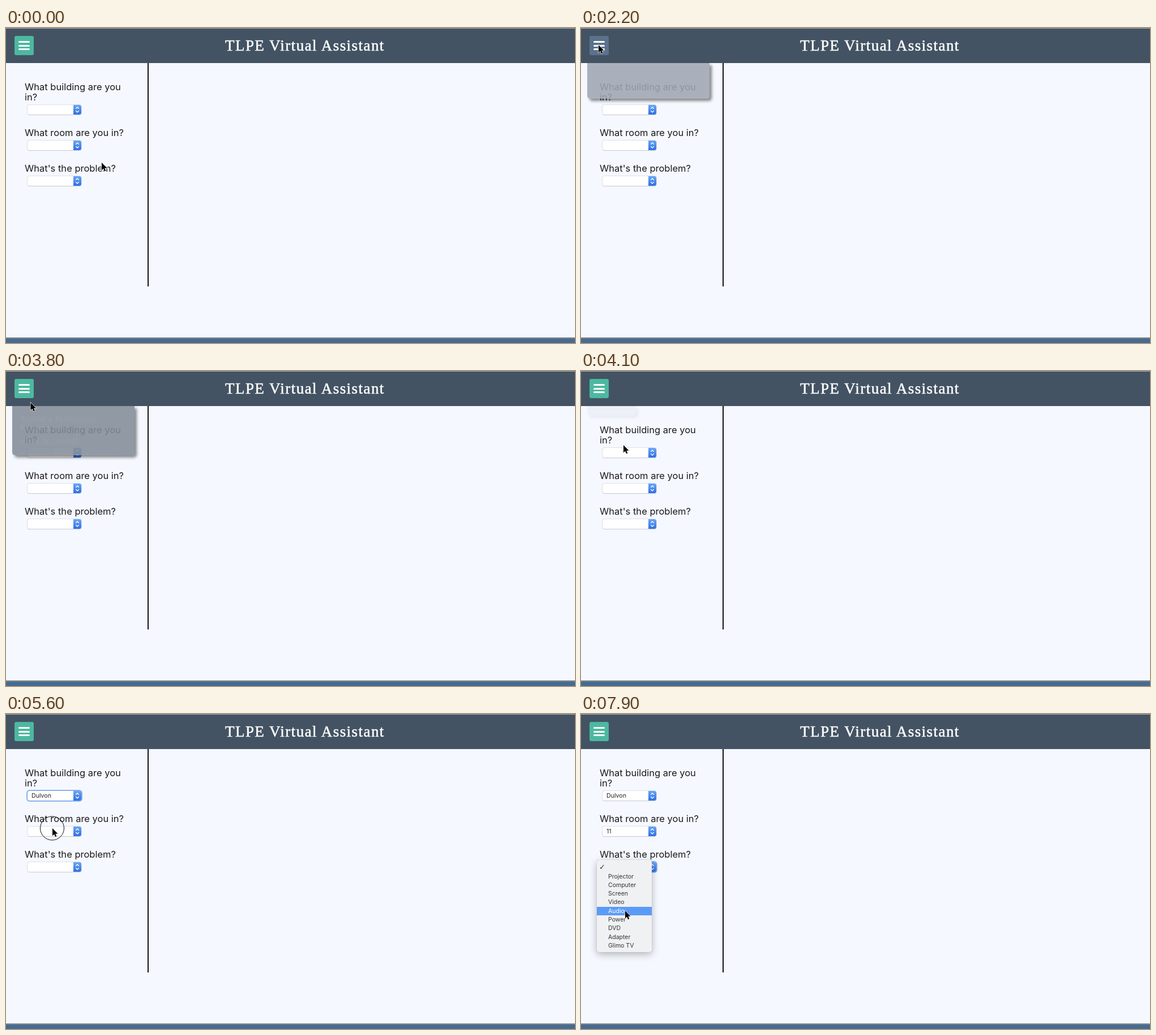
An HTML page that plays this animation: 1005x557 px, repeating every 8 s.

```html
<!DOCTYPE html>
<html lang="en">
<head>
<meta charset="utf-8">
<title>Virtual Assistant</title>
<style>
html, body { margin: 0; width: 100%; height: 100%; overflow: hidden; }
body { background: #f5f8fe; font-family: Inter, sans-serif; }
#stage { position: relative; width: 1005px; height: 557px; overflow: hidden; white-space: nowrap; }
#stage div, #stage svg { position: absolute; box-sizing: border-box; }
#header { left: 0; top: 0; width: 1005px; height: 62px; background: #435363; border-top: 1px solid #a9b1b9; }
#title { left: 387px; top: 0; color: #fff; font: 27px/62px "Liberation Serif", serif; letter-spacing: 1.45px; -webkit-text-stroke: .55px #fff; }
#button { left: 15px; top: 14px; width: 34px; height: 34px; border-radius: 3px; }
#button div { left: 7px; width: 20px; height: 3px; border-radius: 1.5px; background: #fff; }
#rule { left: 250px; top: 62px; width: 2px; height: 395px; background: #111; }
#footer { left: 0; top: 547px; width: 1005px; height: 10px; background: #466b92; border-top: 2px solid #8b8d90; }
.question { left: 33px; font-size: 16.5px; line-height: 18px; color: #1a1a1a; }
.select { left: 38px; width: 95px; height: 17px; padding-left: 7px; border-radius: 3.5px; background: #fff; font-size: 10.6px; line-height: 17px; color: #222; }
.select svg { right: 0; top: 0; }
#menu { left: 11px; top: 62px; border-radius: 0 0 5px 5px; overflow: hidden; }
#menu div { left: 14px; color: #fff; font-size: 13.5px; font-weight: 500; line-height: 15px; }
.popup { left: 28px; width: 97px; padding: 4px 0; border-radius: 4px; background: #f0f1f3; box-shadow: 0 0 1px #888, 0 4px 14px rgba(0,0,0,.28); font-size: 10.5px; color: #333; }
#stage .popup div { position: relative; height: 15.33px; line-height: 15.33px; padding-left: 20px; }
#stage .popup .blank { height: 17.5px; line-height: 17px; padding-left: 4px; font: bold 13px/17px "DejaVu Sans", sans-serif; }
#ring { left: 0; top: 0; width: 43px; height: 43px; border: 1.7px solid #111; border-radius: 50%; }
#pointer { left: 0; top: 0; }
</style>
</head>
<body>
<div id="stage">
  <div id="rule"></div>
  <div id="footer"></div>
  <div class="question" style="top:95px">What building are you<br>in?</div>
  <div class="question" style="top:176px">What room are you in?</div>
  <div class="question" style="top:239px">What's the problem?</div>
  <div id="fields"></div>
  <div id="menu">
    <div style="top:16px">Submit a Technology<br>Request</div>
    <div style="top:55px">What do I need?</div>
    <div style="top:80px">Campus Technology Home</div>
    <div style="top:104px">TLPE Home</div>
    <div style="top:129px">Request Manager</div>
  </div>
  <div id="header"></div>
  <div id="title">TLPE Virtual Assistant</div>
  <div id="button"><div style="top:9px"></div><div style="top:15.5px"></div><div style="top:22px"></div></div>
  <div id="popups"></div>
  <div id="ring"></div>
  <svg id="pointer" width="16" height="22" viewBox="-2 -2 16 22">
    <path d="M0 0V13.4L3 10.5 5.1 15.3 7.4 14.3 5.3 9.8H9.5Z" fill="#000" stroke="#fff" stroke-width="1.2" paint-order="stroke"/>
  </svg>
</div>
<script>
const LOOP = 8000, STEP = 100;
const $ = id => document.getElementById(id);
const clamp = v => Math.max(0, Math.min(1, v));
const mix = (a, b, k) => a + (b - a) * k;
const range = (a, b) => Array.from({ length: b - a + 1 }, (_, i) => a + i);

// y: centre of the field; open/close: popup times; focus: start and end of the focus glow
const fields = [
  { y: 144.5, open: 4500, close: 5200, focus: [4500, 5700], value: "Dulvon",
    items: ["Library", "Chapel", "Dulvon", "Gymnasium", "Main Hall"] },
  { y: 207.5, open: 5700, close: 6300, focus: [5700, 7200], value: "11",
    items: [11, 12, 13, 15, 16, 17, 20, ...range(101, 105), 195, ...range(201, 212)] },
  { y: 270.5, open: 7200, close: LOOP, focus: [7200, LOOP], value: "",
    items: ["Projector", "Computer", "Screen", "Video", "Audio", "Power", "DVD", "Adapter", "Glimo TV"] }
];

// time, x, y of the pointer tip
const path = [
  [0, 169, 238], [100, 169, 238], [1100, 33, 34], [1500, 31, 30], [2800, 31, 30], [2900, 33, 31],
  [3700, 33, 31], [4100, 75, 131], [4350, 79, 139], [4600, 79, 139], [5050, 80, 189], [5250, 80, 190],
  [5550, 82, 202], [5900, 82, 202], [6200, 82, 217], [6300, 82, 218], [6500, 82, 236],
  [6950, 79, 266], [7350, 79, 266], [7900, 78, 348], [LOOP, 78, 348]
];
const clicks = [1600, 3600, 4400, 5100, 5600, 6200, 7000];

const arrows = `<svg width="14" height="17"><defs><linearGradient id="blue" x2="0" y2="1">
  <stop stop-color="#6ba6f5"/><stop offset="1" stop-color="#2f6fe3"/></linearGradient></defs>
  <path d="M0 0H10.5Q14 0 14 3.5V13.5Q14 17 10.5 17H0Z" fill="url(#blue)"/>
  <path d="M4.3 6.8 7 4 9.7 6.8M4.3 10.2 7 13 9.7 10.2" fill="none" stroke="#fff" stroke-width="1.3"/></svg>`;

function add(parent, className, top, html) {
  const el = document.createElement("div");
  el.className = className;
  el.style.top = top + "px";
  el.innerHTML = html;
  return parent.appendChild(el);
}

for (const f of fields) {
  f.box = add($("fields"), "select", f.y - 8.5, `<span></span>${arrows}`);
  f.popup = add($("popups"), "popup", f.y - 12.5,
    `<div class="blank">✓</div>` + f.items.map(s => `<div>${s}</div>`).join(""));
}

function pointerAt(t) {
  const i = Math.max(1, path.findIndex(p => p[0] >= t));
  const [t0, x0, y0] = path[i - 1], [t1, x1, y1] = path[i];
  const k = (t - t0) / (t1 - t0);
  return [mix(x0, x1, k), mix(y0, y1, k)];
}

function drawMenu(t) {
  const p = t < 3600 ? clamp((t - 1730) / 1000 + Math.max(0, t - 2400) / 1000)
                     : clamp((4130 - t) / 530);
  const style = $("menu").style;
  const rgb = [[246, 62], [249, 74], [254, 92]].map(c => Math.round(mix(c[0], c[1], p)));
  style.display = p ? "" : "none";
  style.width = 216 * Math.min(1, p * 7) + "px";
  style.height = 14 + 142 * p ** 1.4 + "px";
  style.background = `rgba(${rgb},.88)`;
  style.boxShadow = `4px 4px 5px rgba(0,0,0,${Math.min(.45, p)})`;
  for (const line of $("menu").children) line.style.opacity = clamp((p - .6) / .4);
}

function drawField(f, t) {
  const focused = t >= f.focus[0] && t < f.focus[1];
  f.box.firstChild.textContent = t >= f.close + 300 ? f.value : "";
  f.box.style.boxShadow = focused ? "0 0 0 1.8px #79a8ee" : "0 0 0 .5px #c5c9cf, 0 1px 1px #c9cdd3";
  const alpha = t < f.open ? 0 : clamp(1 - (t - f.close) / 235);
  f.popup.style.display = alpha ? "" : "none";
  f.popup.style.opacity = alpha;
  const y = pointerAt(Math.min(t, f.close))[1];
  const active = Math.round((y - f.y - 16.5) / 15.33) + 1;
  [...f.popup.children].forEach((row, i) => {
    const on = i > 0 && i === active;
    row.style.background = on ? "#5a9bf7" : "";
    row.style.color = on ? "#fff" : "";
  });
}

function draw(t) {
  const [x, y] = pointerAt(t);
  $("pointer").style.transform = `translate(${x - 2}px,${y - 2}px)`;
  $("ring").style.transform = `translate(${x - 22}px,${y - 21.5}px)`;
  $("ring").style.display = clicks.some(c => t >= c && t < c + 200) ? "" : "none";
  $("button").style.background = x < 49 && y < 48 ? "#5b728d" : "#4db8a0";
  drawMenu(t);
  fields.forEach(f => drawField(f, t));
}

const start = performance.now();
function tick() {
  const t = (performance.now() - start) % LOOP;
  draw(Math.floor(t / STEP) * STEP);
  requestAnimationFrame(tick);
}
tick();
</script>
</body>
</html>
```
